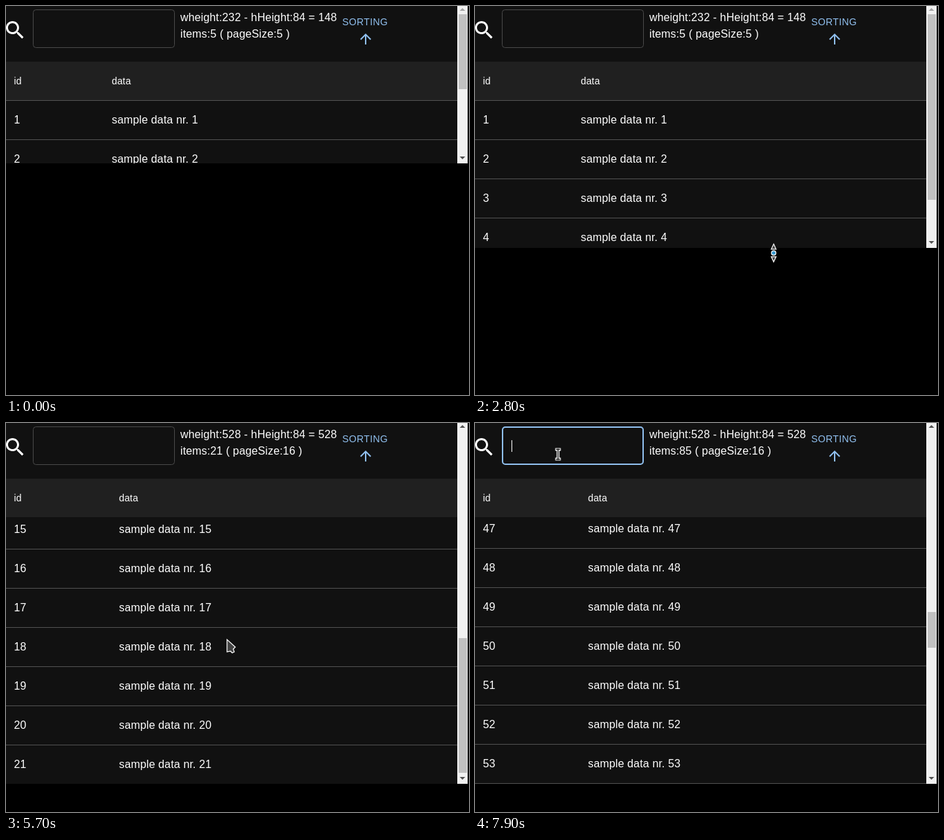
These frames come from a looping animation (672 px wide and 566 px high, 8 s). An HTML page with a canvas:

```html
<!DOCTYPE html>
<html lang="en">
<head>
<meta charset="utf-8">
<title>Resizable data table</title>
<style>
  html, body { margin: 0; width: 100%; height: 100%; overflow: hidden; background: #000; }
  canvas { display: block; }
</style>
</head>
<body>
<canvas id="stage" width="672" height="566"></canvas>
<script>
const ctx = document.getElementById('stage').getContext('2d');
const LOOP = 8000, STEP = 100;
const HEAD = 81, BODY = 137, ROW = 57, WIDTH = 670, BAR = 15;
const FONT = '"Liberation Sans", Arial, sans-serif';
const BLUE = '#90bfee', PANEL = '#111';

const SEARCH = new Path2D('M15.5 14h-.79l-.28-.27C15.41 12.59 16 11.11 16 9.5 16 5.91 13.09 3 9.5 3S3 5.91 3 9.5 5.91 16 9.5 16c1.61 0 3.09-.59 4.23-1.57l.27.28v.79l5 4.99L20.49 19l-4.99-5zm-6 0C7.01 14 5 11.99 5 9.5S7.01 5 9.5 5 14 7.01 14 9.5 11.99 14 9.5 14z');
const UP = new Path2D('M4 12l1.41 1.41L11 7.83V20h2V7.83l5.58 5.59L20 12l-8-8-8 8z');
const POINTER = new Path2D('M.5.5V18.5L5.5 17.5 8 20 11 18.5 9.5 14.5 12.5 11.5Z');

// Keys are [time, value, easing]; easing shapes the way to that key.
const linear = p => p;
const smooth = p => p * p * (3 - 2 * p);

const heightKeys = [[2400, 229], [3300, 525, smooth]];
const scrollKeys = [[5150, 0], [5650, 809], [6100, 809], [6800, 2154], [7050, 2634]];
const cursorX = [[100, 649], [900, 520, smooth], [1800, 436, smooth], [2400, 436], [3300, 430, smooth],
  [3600, 430], [4200, 345, smooth], [4800, 320.5, smooth], [7200, 320], [7650, 120.5, smooth]];
const cursorY = [[100, 272], [900, 240, smooth], [1800, 236, smooth], [2400, 235.5], [3300, 532.5, smooth],
  [3600, 532.5], [4200, 390, smooth], [4800, 314.5, smooth], [7200, 314.5], [7650, 45.5, smooth]];

function track(keys, t) {
  if (t <= keys[0][0]) return keys[0][1];
  for (let i = 1; i < keys.length; i++) {
    const [t0, v0] = keys[i - 1], [t1, v1, ease = linear] = keys[i];
    if (t <= t1) return v0 + (v1 - v0) * ease((t - t0) / (t1 - t0));
  }
  return keys[keys.length - 1][1];
}

function rect(x, y, w, h, color) {
  ctx.fillStyle = color;
  ctx.fillRect(x, y, w, h);
}

function text(str, x, y, size = 16, color = '#fff', spacing = 0.15) {
  ctx.font = `${size}px ${FONT}`;
  ctx.letterSpacing = spacing + 'px';
  ctx.fillStyle = color;
  ctx.fillText(str, x, y);
}

function icon(path, x, y, scale, color) {
  ctx.save();
  ctx.translate(x, y);
  ctx.scale(scale, scale);
  ctx.fillStyle = color;
  ctx.fill(path);
  ctx.restore();
}

function triangle(x, y, w, h) {
  ctx.beginPath();
  ctx.moveTo(x, y);
  ctx.lineTo(x + w / 2, y + h);
  ctx.lineTo(x - w / 2, y + h);
  ctx.closePath();
}

function drawRows(s) {
  const right = s.bar ? WIDTH - BAR : WIDTH;
  ctx.save();
  ctx.beginPath();
  ctx.rect(0, BODY, right, Math.max(0, s.height - BODY));
  ctx.clip();
  const first = Math.max(0, Math.floor(s.scroll / ROW) - 1);
  const last = Math.min(s.items, first + 10);
  for (let i = first; i <= last; i++) {
    const y = BODY + i * ROW - s.scroll;
    rect(0, y, right, 1, '#515151');
    if (i < s.items) {
      text(i + 1, 11.5, y + 34);
      text('sample data nr. ' + (i + 1), s.col, y + 34);
    }
  }
  ctx.restore();
}

function drawToolbar(s) {
  icon(SEARCH, -4.4, 17.6, 35 / 24, '#fff');
  ctx.strokeStyle = s.focus ? BLUE : '#494949';
  ctx.lineWidth = s.focus ? 2 : 1;
  const d = ctx.lineWidth / 2;
  ctx.beginPath();
  ctx.roundRect(39 + d, 5 + d, 206 - 2 * d, 56 - 2 * d, 4);
  ctx.stroke();
  if (s.caret) rect(53, 25, 1, 17, '#fff');

  const [win, body] = s.items > 5 ? [528, 528] : [232, 148];
  text(`wheight:${win} - hHeight:84 = ${body}`, 253, 22);
  text(`items:${s.items} ( pageSize:${s.items > 5 ? 16 : 5} )`, 253, 46);
  text('SORTING', 488, 28, 14, BLUE, 0.4);
  icon(UP, 510, 36, 1, BLUE);
}

function drawScrollbar(s) {
  const x = WIDTH - BAR, run = s.height - 28;
  rect(x, 0, BAR, s.height, '#f1f1f1');
  rect(x + 2, Math.round(12 + run * s.scroll / s.content), 12,
    Math.round(run * s.height / s.content), '#c1c1c1');
  ctx.fillStyle = s.scroll > 0 ? '#505050' : '#a3a3a3';
  triangle(x + 7.5, 3, 8, 4);
  ctx.fill();
  ctx.fillStyle = '#505050';
  triangle(x + 7.5, s.height - 6, 8, -4);
  ctx.fill();
}

function drawResize(x, y) {
  ctx.strokeStyle = '#fff';
  ctx.lineWidth = 1.2;
  ctx.fillStyle = '#444';
  for (const dir of [-1, 1]) {
    triangle(x, y + 13 * dir, 7, -7.5 * dir);
    ctx.fill();
    ctx.stroke();
  }
  ctx.fillStyle = '#3b9bd0';
  ctx.beginPath();
  ctx.arc(x, y, 3.3, 0, 7);
  ctx.fill();
  ctx.stroke();
}

function drawBeam(x, y) {
  rect(x - 4, y - 9, 8, 4, '#fff');
  rect(x - 4, y + 5, 8, 4, '#fff');
  rect(x - 2, y - 8, 4, 16, '#fff');
  rect(x - 3, y - 8, 6, 1.5, '#222');
  rect(x - 3, y + 6.5, 6, 1.5, '#222');
  rect(x - 0.75, y - 8, 1.5, 16, '#222');
}

function drawCursor(t) {
  if (t < 100) return;
  const x = track(cursorX, t), y = track(cursorY, t);
  if (t >= 1800 && t < 3700) return drawResize(x, y);
  if (x < 240 && y < 61) return drawBeam(x, y);
  ctx.save();
  ctx.translate(x, y);
  ctx.fillStyle = '#444';
  ctx.strokeStyle = '#fff';
  ctx.lineWidth = 1.2;
  ctx.fill(POINTER);
  ctx.stroke(POINTER);
  ctx.restore();
}

function draw(t) {
  const items = t < 4400 ? 5 : t < 6000 ? 21 : t < 7300 ? 53 : 85;
  const height = Math.round(track(heightKeys, t));
  const content = BODY + items * ROW;
  const bar = content > height;
  const s = {
    items, height, content, bar,
    scroll: Math.round(track(scrollKeys, t)),
    col: items > 5 ? 164 : bar ? 153.5 : 156.5,
    focus: t >= 7700,
    caret: t >= 7900
  };
  rect(0, 0, 672, 566, '#000');
  rect(0, 0, WIDTH, height, PANEL);
  drawRows(s);
  rect(0, HEAD, WIDTH, BODY - HEAD, '#202020');
  text('id', 11.5, 114, 14);
  text('data', s.col, 114, 14);
  drawToolbar(s);
  if (bar) drawScrollbar(s);
  drawCursor(t);
}

const start = performance.now();
function tick() {
  const t = (performance.now() - start) % LOOP;
  draw(Math.floor(t / STEP) * STEP);
  requestAnimationFrame(tick);
}
tick();
</script>
</body>
</html>
```
